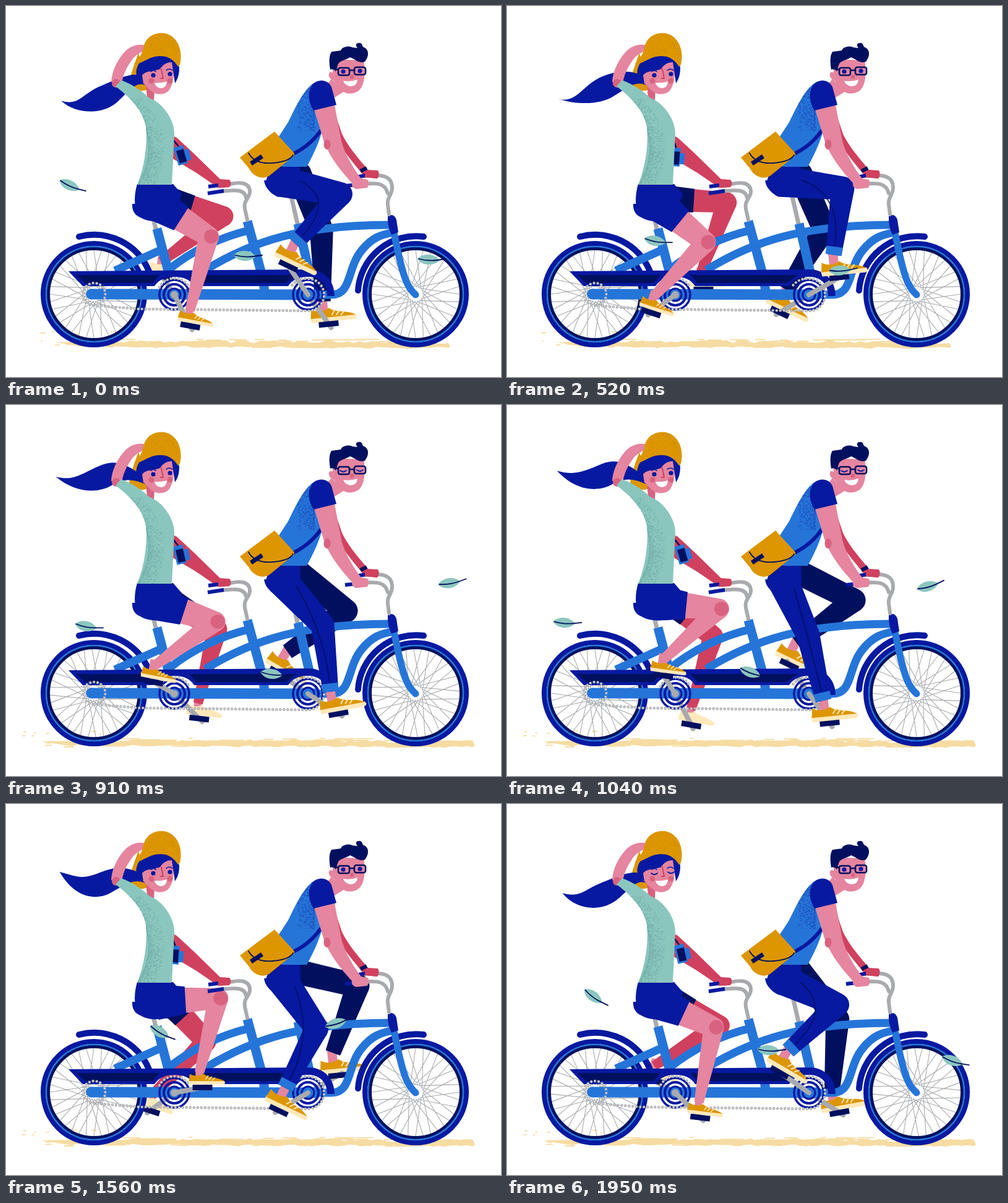
Recreate the animation shown at these times as an HTML page. Size 800 px wide and 600 px high, loop 2.08 s.

```html
<!DOCTYPE html>
<html lang="en">
<head>
<meta charset="utf-8">
<title>Tandem ride</title>
<style>
  html, body { margin: 0; width: 100%; height: 100%; overflow: hidden; background: #fff; }
  svg { display: block; width: 800px; height: 600px; }
  .royal { fill: #0619a0; } .navy { fill: #00105f; } .blue { fill: #2575d9; }
  .skin { fill: #e5859f; } .shade { fill: #d0415f; } .blush { fill: #d8627f; }
  .gold { fill: #dd9600; } .mint { fill: #8bc6be; } .cream { fill: #ffe8ba; } .sand { fill: #f6dca2; }
  .line { fill: none; stroke-linecap: round; stroke-linejoin: round; }
  .sRoyal { stroke: #0619a0; } .sNavy { stroke: #00105f; } .sBlue { stroke: #2575d9; }
  .sGray { stroke: #a8aaad; } .sCream { stroke: #ffe8ba; } .sSand { stroke: #f6dca2; }
  .butt { stroke-linecap: butt; }
  .dots { fill: none; stroke-width: 1.4; stroke-linecap: square; }
</style>
</head>
<body>
<svg viewBox="0 0 800 600">
  <defs>
    <g id="wheel">
      <circle r="82" class="line sRoyal" stroke-width="8"/>
      <circle r="74" class="line sNavy" stroke-width="6"/>
      <circle r="77" class="line sBlue" stroke-width="2.5"/>
    </g>
    <path id="spokes" class="line sGray" stroke-width="1.1"/>
    <g id="rings" class="line sRoyal">
      <circle r="24" stroke-width="3.5"/>
      <circle r="17" stroke-width="4"/>
      <circle r="10" stroke-width="3" fill="#2575d9"/>
    </g>
    <g id="leaf">
      <path class="mint" d="M-22-1C-14-10 4-11 14 1C4 11-14 11-22-1Z"/>
      <path class="line sNavy" stroke-width="1.8" d="M-20-1Q-4 3 10 1T24-1"/>
    </g>
    <g id="shoe">
      <path class="cream" d="M-23 22L51 23Q56 29 49 31L-21 31Z"/>
      <path d="M-20 9Q-6 17 9 9C20 19 40 15 51 24L-22 24Z"/>
      <path class="line sCream" stroke-width="2" d="M13 20L18 13M20 21L25 15M27 22L32 17"/>
    </g>
    <path id="shirtW" d="M186 120C205 127 222 139 232 149C252 156 272 182 272 207L268 289L212 289C224 260 229 222 226 195C222 172 204 150 177 130Z"/>
    <path id="shirtM" d="M502 122C482 132 470 160 456 188L439 214L446 260L486 260C496 242 506 222 513 195L520 150Z"/>
    <path id="hat" d="M207 94C212 86 219 82 222 68C225 50 240 42 256 44C276 48 287 70 281 95L278 98C268 82 255 79 240 82C228 85 216 95 207 94Z"/>
    <clipPath id="clipW"><use href="#shirtW"/></clipPath>
    <clipPath id="clipM"><use href="#shirtM"/></clipPath>
    <clipPath id="clipH"><use href="#hat"/></clipPath>
  </defs>

  <g id="ground"></g>
  <g id="farLegs"></g>

  <g id="wheels">
    <g transform="translate(142 466)"><use class="spin" href="#spokes"/><use href="#wheel"/></g>
    <g transform="translate(662 466)"><use class="spin" href="#spokes"/><use href="#wheel"/></g>
    <g class="line sRoyal" stroke-width="10">
      <path d="M118 373A96 96 0 0 1 231 429"/>
      <path d="M675 373A94 94 0 0 0 569 460"/>
    </g>
  </g>

  <g class="line sGray" stroke-width="7">
    <path d="M237 340L244 368M460 304L472 356"/>
  </g>
  <g class="line sBlue butt" stroke-width="13">
    <path d="M176 428L256 392"/>
    <path d="M262 427Q320 380 396 362"/>
    <path d="M322 427C400 379 480 354 622 354"/>
    <path d="M505 467L525 467C560 467 550 425 575 395C592 374 606 370 626 366"/>
    <path d="M244 360L262 428M390 348L415 440L419 470M472 352L490 430" stroke-width="15"/>
    <path d="M138 466L500 467" stroke-width="17" stroke-linecap="round"/>
    <path d="M626 362C632 390 638 425 648 448Q654 460 662 467" stroke-width="11" style="stroke-linecap:round"/>
  </g>
  <circle cx="138" cy="466" r="8.5" class="blue"/>
  <path class="royal" d="M617 340Q627 334 631 346L634 366L623 370Q616 356 617 340Z"/>
  <path class="royal" d="M101 429L488 426C515 426 531 445 531 469L519 469C519 448 505 438 488 438C472 438 462 444 456 453L304 453C298 443 287 438 272 438C257 438 246 443 240 453L124 453Z"/>
  <path class="navy" d="M113 435L248 435L237 448L128 448ZM296 435L470 435L452 448L308 448Z"/>
  <use href="#rings" x="272" y="467"/>
  <use href="#rings" x="488" y="467"/>
  <g id="chain"></g>

  <path class="royal" d="M204 320Q203 340 224 344L262 347L260 318ZM417 282Q420 303 444 306L474 305L470 280Z"/>

  <g id="nearLegs"></g>

  <path class="shade" d="M268 209L276 213L302 237L346 280L361 281Q366 287 361 293L343 294L308 270L268 246Z"/>
  <path class="shade" d="M528 162L543 207C555 231 572 249 585 265L601 266Q605 273 600 279L580 277C562 254 545 236 534 213Z"/>
  <path class="line sNavy butt" stroke-width="6" d="M573 267L583 262"/>
  <g class="line sGray" stroke-width="6">
    <path d="M390 346L386 328C383 313 396 310 394 298C392 286 380 284 362 288M388 310C386 298 376 296 345 300"/>
    <path d="M619 337L617 321C615 310 624 306 624 294C624 277 612 271 580 275M617 303C613 288 605 284 565 289"/>
  </g>
  <g class="line sRoyal butt" stroke-width="6">
    <path d="M327 292L343 290M326 303L352 299M548 291L566 289M565 277L581 274"/>
  </g>
  <path class="shade" d="M345 281L361 281Q366 287 361 293L342 294ZM580 267L600 266Q605 273 600 279L580 277Z"/>

  <g id="camera">
    <path class="line sNavy" stroke-width="2.5" d="M268 214L276 232"/>
    <path class="blue" d="M266 229H282V237H289V255H282V259H266Z"/>
    <path class="navy" d="M269 235H281V256H269Z"/>
  </g>

  <g id="woman">
    <path class="gold" d="M214 76C206 98 200 114 199 128C208 139 222 139 232 134Z"/>
    <path id="tail" class="royal"/>
    <path class="blush" d="M226 126L240 134L239 154L228 148Z"/>
    <path class="skin" d="M170 123C171 104 181 86 192 74C201 65 212 61 223 63L225 72C214 76 206 82 201 91C194 101 189 112 187 126Z"/>
    <circle class="blush" cx="178" cy="125" r="7"/>
    <use href="#shirtW" class="mint"/>
    <path id="dotsW" class="dots" stroke="#72b0a9" clip-path="url(#clipW)"/>
    <path class="skin" d="M222 104L268 90C273 108 271 128 262 138C252 146 238 143 230 133L223 126Q216 122 217 113Q219 108 222 110Z"/>
    <circle class="blush" cx="235" cy="121" r="4.5"/><circle class="blush" cx="265" cy="121" r="4.5"/>
    <path class="line" stroke="#d0415f" stroke-width="2" d="M251 102L254 117H250"/>
    <path fill="#fff" d="M240 124Q250 125 260 122Q259 133 250 133Q242 132 240 124Z"/>
    <path class="line sRoyal" stroke-width="1.6" d="M234 106Q238 103 242 106M259 104Q264 100 269 104"/>
    <g id="eyesW"></g>
    <path class="royal" d="M211 103C215 84 235 76 253 78C268 79 279 86 280 100C280 112 277 119 273 125L268 91C260 91 253 95 249 102C238 106 226 104 220 112L222 125C212 118 209 110 211 103Z"/>
    <use href="#hat" class="gold"/>
    <path id="dotsH" class="dots" stroke="#c98b10" clip-path="url(#clipH)"/>
  </g>

  <g id="man">
    <path class="skin" d="M526 118L547 138L531 148L518 128Z"/>
    <use href="#shirtM" class="blue"/>
    <path id="dotsM" class="dots" stroke="#1c50be" clip-path="url(#clipM)"/>
    <path class="line sRoyal butt" stroke-width="6" d="M460 241Q490 228 509 201"/>
    <path class="skin" d="M527 86L578 88C582 114 578 130 570 137C558 145 545 142 538 132L530 121Q520 117 522 109Q524 105 528 108Z"/>
    <path class="navy" d="M524 103C522 90 522 80 526 74L541 72C543 66 553 64 560 67L568 68C563 62 567 59 573 60C577 62 575 66 579 67C587 71 587 81 580 90C572 94 564 86 556 83C548 88 538 88 536 96L533 106Q529 100 524 103Z"/>
    <path class="blush" d="M556 112L562 111L562 117L556 118Z"/>
    <path fill="#fff" d="M545 121Q557 123 568 119Q567 130 557 130Q548 129 545 121Z"/>
    <g id="eyesM"></g>
    <g class="line sNavy" stroke-width="2.6">
      <rect x="537" y="100" width="18" height="12" rx="3"/><rect x="563" y="99" width="18" height="12" rx="3"/>
      <path d="M555 104H563M527 101L537 103"/>
    </g>
    <path class="gold" d="M434 203L465 237Q468 241 462 245L425 275Q415 281 403 274Q396 270 393 263L378 245Z"/>
    <path class="line sNavy" stroke-width="1.8" d="M392 238Q402 256 430 254T464 241"/>
    <path class="line sNavy butt" stroke-width="7" d="M396 255L414 243"/>
    <path class="skin" d="M497 164L531 160L541 213C545 234 558 258 574 279L585 281Q588 288 584 294L566 296Q558 294 559 286C544 270 524 246 514 220Z"/>
    <ellipse class="blush" cx="519" cy="224" rx="5.5" ry="8"/>
    <path class="royal" d="M493 131C500 117 520 117 526 131L534 160L497 169C489 155 487 142 493 131Z"/>
  </g>

  <g id="leaves"></g>
</svg>

<script>
const STEP = 130, FRAMES = 16, TURN = 360 / FRAMES;
const $ = id => document.getElementById(id);
const cos = d => Math.cos(d * Math.PI / 180), sin = d => Math.sin(d * Math.PI / 180);
const add = (p, q) => [p[0] + q[0], p[1] + q[1]];
const mix = (p, q, f) => [p[0] + (q[0] - p[0]) * f, p[1] + (q[1] - p[1]) * f];

let seed = 7;
const rnd = () => (seed = seed * 16807 % 2147483647) / 2147483647;

// ---------- static texture ----------
const dots = (n, at) => Array.from({ length: n }, () => {
  const [x, y] = at(rnd(), rnd());
  return `M${x.toFixed(1)} ${y.toFixed(1)}h.1`;
}).join('');

$('dotsW').setAttribute('d', dots(900, (u, r) => [197 + 16 * u + 100 * u * (1 - u) + 26 * r ** 3, 150 + 139 * u]));
$('dotsM').setAttribute('d', dots(420, (u, r) => [498 - 27 * r * r, 126 + 76 * u]));
$('dotsH').setAttribute('d', dots(90, (u, r) => [228 + 52 * u, 47 + 32 * r]));

$('spokes').setAttribute('d', Array.from({ length: 36 }, (_, i) => {
  const a = i * 10, hub = a + (i % 2 ? 50 : -50);
  return `M${12 * cos(hub)} ${12 * sin(hub)}L${71 * cos(a)} ${71 * sin(a)}`;
}).join(''));

function sand(x0, x1) {
  let top = '', low = '', streaks = '';
  for (let x = x0 + 50; x < x1; x += 9) {
    const y = 545 + (x - x0) * .004;
    top += `L${x} ${y - 1 - rnd() * 5}`;
    low = `L${x} ${y + 4 + rnd() * 3}` + low;
  }
  for (let i = 0; i < 85; i++) {
    const x = x0 + rnd() * (x1 - x0 - 40), y = 539 + rnd() * 14;
    streaks += `M${x} ${y}h${4 + rnd() * 36}`;
  }
  for (let i = 0; i < 12; i++) streaks += `M${x0 - 35 + rnd() * 160} ${527 + rnd() * 16}h${1 + rnd() * 7}`;
  return `<path class="sand" d="M${x0} 544${top}L${x1} 551${low}Z"/>` +
    `<path class="line sSand" stroke-width="1.8" d="${streaks}"/>`;
}
const sands = [sand(80, 718), sand(107, 748), sand(56, 758)];
const sandOrder = [0, 1, 2, 2, 0, 1, 1, 2, 2, 0, 0, 1, 2, 0, 1, 2];

// ---------- riders ----------
const woman = {
  hip: [245, 320], farHip: [12, -8], axle: [272, 467], thigh: 98, shin: 124, farShin: 0,
  start: 59, pedal: [5, 24], size: 'translate(0 -5) scale(.78)',
  ankle: a => [274 + 45 * cos(a), 453 + 44 * sin(a + 6)],
  tilt: a => 9 + 9 * cos(a - 140)
};
const man = {
  hip: [446, 284], farHip: [28, -12], axle: [488, 467], thigh: 97, shin: 111, farShin: 7,
  start: 239, pedal: [6, 35], size: '',
  ankle: a => [489 + 45 * cos(a), 433 + 55 * sin(a)],
  tilt: a => 10 + 22 * cos(a - 194)
};

function limb(p, q, r, s, cls, flat) {
  const dx = q[0] - p[0], dy = q[1] - p[1], len = Math.hypot(dx, dy) || 1;
  const side = (c, w) => [c[0] - dy / len * w, c[1] + dx / len * w];
  const cap = w => flat ? 'L' : `A${w} ${w} 0 0 0 `;
  return `<path class="${cls}" d="M${side(p, r)}L${side(q, s)}${cap(s)}${side(q, -s)}L${side(p, -r)}${cap(r)}${side(p, r)}Z"/>`;
}

function bend(hip, foot, a, b) {
  const dx = foot[0] - hip[0], dy = foot[1] - hip[1], real = Math.hypot(dx, dy);
  const d = Math.min(real, a + b - .1), ux = dx / real, uy = dy / real;
  const along = (d * d + a * a - b * b) / (2 * d), out = Math.sqrt(Math.max(0, a * a - along * along));
  return [hip[0] + ux * along + uy * out, hip[1] + uy * along - ux * out];
}

function leg(who, k, far) {
  const a = who.start + k * TURN + (far ? 180 : 0);
  const hip = far ? add(who.hip, who.farHip) : who.hip;
  const foot = who.ankle(a), tilt = who.tilt(a);
  const knee = bend(hip, foot, who.thigh, who.shin + (far ? who.farShin : 0));
  const [px, py] = who.pedal;
  const pedal = add(foot, [px * cos(tilt) - py * sin(tilt), px * sin(tilt) + py * cos(tilt)]);
  const tip = mix(who.axle, pedal, 1.12);
  const skin = far ? 'shade' : 'skin', cloth = far ? 'navy' : 'royal';
  const isMan = who === man;
  const upper = far && !isMan ? 'cream' : 'gold';

  const crank = `<path class="line sGray" stroke-width="8" d="M${who.axle}L${tip}"/>` +
    `<rect class="navy" x="-16" y="-4.5" width="32" height="9" transform="translate(${pedal}) rotate(${tilt})"/>`;
  const shoe = `<g transform="translate(${foot}) rotate(${tilt}) ${who.size}">` +
    `<path class="skin" d="M-8-8H7V16H-8Z"/><use href="#shoe" class="${upper}"/></g>`;

  let body;
  if (isMan) {
    const end = mix(knee, foot, .98);
    body = limb(hip, knee, far ? 20 : 25, 19, cloth) + limb(knee, end, 19, 12.5, cloth, true);
    if (!far) {
      body += limb(mix(knee, foot, .86), end, 13.5, 13, 'blue', true) +
        `<path class="line sNavy" stroke-width="1.5" d="M${add(hip, [12, -8])}Q${knee} ${mix(knee, foot, .84)}"/>`;
    }
  } else {
    body = limb(hip, knee, far ? 20 : 24, 16.5, skin) + limb(knee, foot, 16.5, 7.5, skin, true);
    if (!far) body += `<circle class="blush" cx="${knee[0] + 4}" cy="${knee[1]}" r="11.5"/>`;
    body += limb(hip, mix(hip, knee, .46), far ? 22 : 29, far ? 19 : 22, cloth, true);
  }
  return far ? shoe + body + crank : crank + shoe + body;
}

const pelvisW = '<path class="royal" d="M212 288L270 288L284 304L270 340C250 352 225 350 214 339C206 325 207 305 212 288Z"/>';
const pelvisM = '<path class="royal" d="M438 260Q460 255 475 258L476 288L440 309C420 300 416 284 424 275Z"/>';
const hub = ([x, y]) => `<circle cx="${x}" cy="${y}" r="6" fill="#a8aaad"/>`;

// ---------- small moving parts ----------
const eyes = (pts, open) => pts.map(([x, y]) => open
  ? `<circle class="royal" cx="${x}" cy="${y}" r="3.6"/>`
  : `<path class="line sRoyal" stroke-width="1.7" d="M${x - 5} ${y}q5 4 10 0"/>`).join('');

const run = 'M142 484L215 490L488 493A26 26 0 0 0 488 441Q472 440 462 452' +
  'M248 455A27 27 0 0 1 296 455M142 484A18 18 0 1 1 143 484';
const chain = k => [['#a8aaad', 4.6], ['#fff', 1.6]].map(([c, w]) =>
  `<path class="line" stroke="${c}" stroke-width="${w}" stroke-dasharray="0 6" stroke-dashoffset="${k * 1.5}" d="${run}"/>`).join('');

function tail(k) {
  const x = 85 + 4.5 * cos((k + 1) * TURN), y = 130 + 31 * cos((k - 1.8) * TURN), m = 131 + 17 * cos((k - .3) * TURN);
  return `M${x} ${y}C${x + 30} ${y + 8} 122 ${m - 6} 154 ${m - 19}S205 106 222 114L225 128` +
    `C206 119 190 ${m + 3} 172 ${m + 13}C150 ${m + 27} 113 ${m + 27} ${x} ${y}Z`;
}

// Each leaf drifts left at constant speed; way points are [step, y, angle].
const drifts = [
  { from: 6, x: 757, v: 36.7, way: [[5, 280, -2], [6, 282, -5], [8, 292, -18], [10, 318, -24], [13, 371, -18], [15, 398, 0], [16, 404, 0], [20, 380, 8], [22, 364, 14], [24, 352, 2], [26, 362, -12], [28, 376, -20]] },
  { from: 13, x: 796, v: 36.3, way: [[12, 448, 22], [13, 440, 20], [15, 416, 17], [16, 410, 0], [20, 427, -5], [22, 437, -8], [24, 433, 18], [26, 410, 30], [29, 350, 28], [31, 313, 34], [32, 291, 22], [36, 240, 10]] }
];
function leaf({ from, x, v, way }, s) {
  const i = way.findIndex((w, j) => j && s <= w[0]);
  if (s < way[0][0] || i < 1) return '';
  const [a, b] = [way[i - 1], way[i]], f = (s - a[0]) / (b[0] - a[0]);
  const [y, r] = mix(a.slice(1), b.slice(1), f);
  return `<use href="#leaf" transform="translate(${x - v * (s - from)} ${y}) rotate(${r})"/>`;
}

// ---------- one drawing step ----------
function draw(k) {
  $('ground').innerHTML = sands[sandOrder[k]];
  $('farLegs').innerHTML = leg(woman, k, true) + leg(man, k, true);
  $('nearLegs').innerHTML = leg(woman, k) + pelvisW + hub(woman.axle) + leg(man, k) + pelvisM;
  $('chain').innerHTML = chain(k);
  $('tail').setAttribute('d', tail(k));
  $('camera').setAttribute('transform', `rotate(${-6 - 10 * cos(k * 2 * TURN)} 270 213)`);
  $('eyesW').innerHTML = eyes([[238, 112], [265, 110]], k < 13);
  $('eyesM').innerHTML = eyes([[545, 106], [572, 105]], k < 7 || k > 9);
  $('leaves').innerHTML = drifts.map(d => [0, 1, 2].map(n => leaf(d, k + n * FRAMES)).join('')).join('');
  document.querySelectorAll('.spin').forEach(w => w.setAttribute('transform', `rotate(${k * TURN})`));
}

const begin = performance.now();
let shown = -1;
function tick() {
  const k = Math.floor((performance.now() - begin) / STEP) % FRAMES;
  if (k !== shown) draw(shown = k);
  requestAnimationFrame(tick);
}
tick();
</script>
</body>
</html>
```
